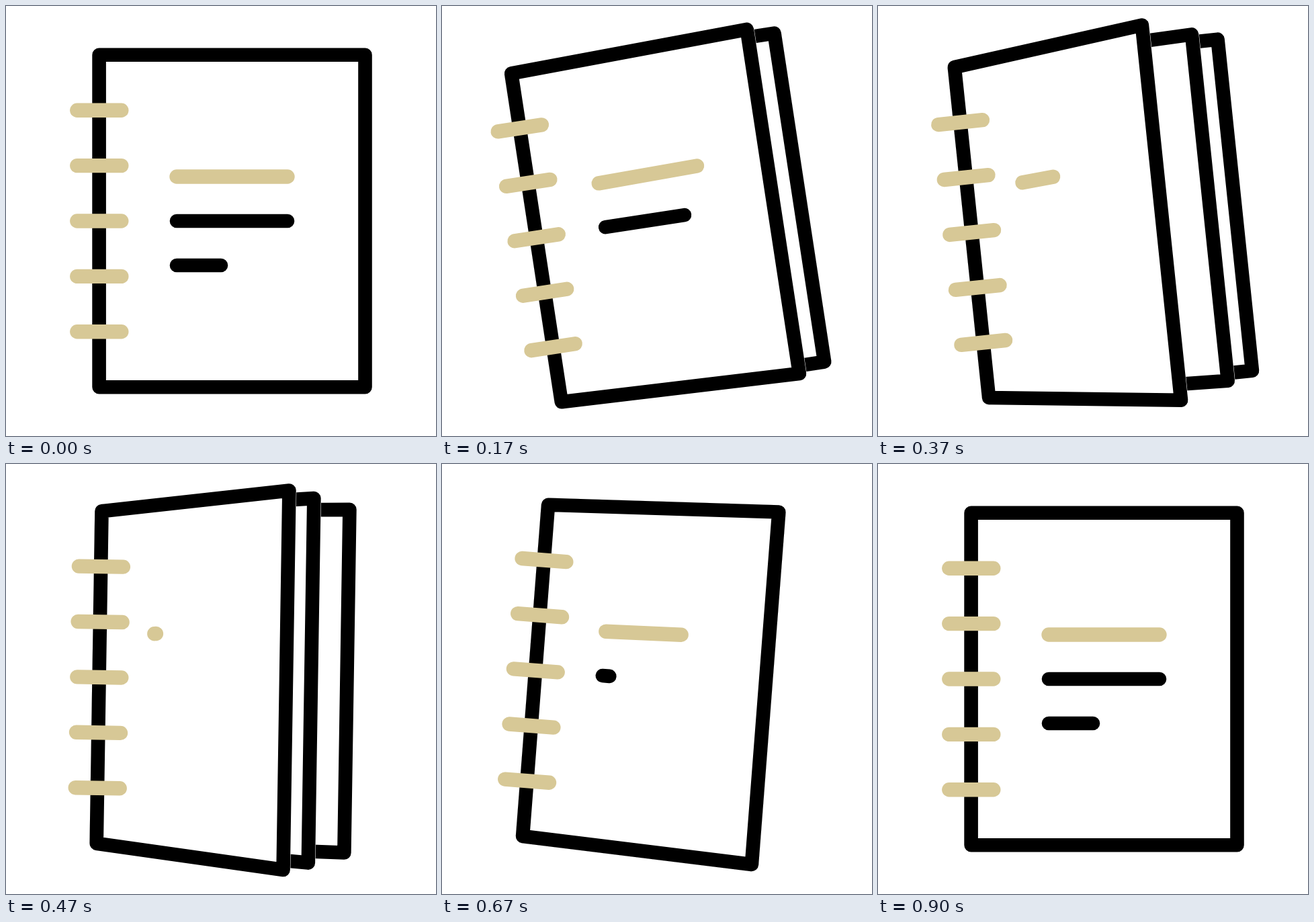
Write an HTML page with a canvas that moves like this. It is 640x640 px and loops after 1.67 s.

```html
<!DOCTYPE html>
<html lang="en">
<head>
<meta charset="utf-8">
<title>Notebook</title>
<style>
  html, body { margin: 0; width: 100%; height: 100%; overflow: hidden; background: #fff; }
  canvas { display: block; width: 100vw; height: 100vh; }
</style>
</head>
<body>
<canvas id="stage" width="640" height="640"></canvas>
<script>
const ctx = document.getElementById('stage').getContext('2d');
const LOOP = 1670, FPS = 30;
const GOLD = '#d7c896', BLACK = '#000', WHITE = '#fff';
const LEFT = 138.6, TOP = 72.7, BOTTOM = 567.3, WIDTH = 395.9;
const PIVOT = { x: 303, y: 320 };

// Smooth 0..1 ramp between two frames
function ramp(f, from, to) {
  const t = Math.min(1, Math.max(0, (f - from) / (to - from)));
  return t * t * (3 - 2 * t);
}

const tilt = f =>
  -10.5 * ramp(f, 0, 6.8) + 16.1 * ramp(f, 7.4, 17.67) - 5.6 * ramp(f, 17.67, 25.5);

// How far the free edge of a sheet has moved towards the spine
const coverFold = f => 119.5 * (ramp(f, 0, 13) - ramp(f, 13, 26));

// A sheet below never folds further than the cover
const sheetFold = (f, delay) => Math.min(coverFold(f), 120 * ramp(f, delay, delay + 13));

function sheet(fold) {
  const right = LEFT + WIDTH - fold, flare = fold * 0.298;
  ctx.beginPath();
  ctx.moveTo(LEFT, TOP);
  ctx.lineTo(right, TOP - flare);
  ctx.lineTo(right, BOTTOM + flare);
  ctx.lineTo(LEFT, BOTTOM);
  ctx.closePath();
  ctx.fillStyle = ctx.strokeStyle = WHITE;
  ctx.lineWidth = 21.6;
  ctx.stroke();
  ctx.fill();
  ctx.strokeStyle = BLACK;
  ctx.lineWidth = 20.6;
  ctx.stroke();
}

function bar(x1, y1, x2, y2, color) {
  ctx.strokeStyle = color;
  ctx.lineWidth = color === GOLD ? 21.4 : 20.6;
  ctx.beginPath();
  ctx.moveTo(x1, y1);
  ctx.lineTo(x2, y2);
  ctx.stroke();
}

// A line of writing on the cover, shown up to the given part of its length
function writing(y, length, part, fold, rise, color) {
  if (part <= 0) return;
  const s = 1 - fold / WIDTH, x = LEFT + 115.4 * s;
  bar(x, y, x + length * s * part, y - rise * part, color);
}

function draw(f) {
  const fold = coverFold(f);
  ctx.fillStyle = WHITE;
  ctx.fillRect(0, 0, 640, 640);
  ctx.save();
  ctx.translate(PIVOT.x, PIVOT.y);
  ctx.rotate(tilt(f) * Math.PI / 180);
  ctx.translate(-PIVOT.x, -PIVOT.y);
  ctx.lineCap = ctx.lineJoin = 'round';

  sheet(sheetFold(f, 10));
  sheet(sheetFold(f, 6));
  sheet(fold);

  writing(254, 165, 1 - ramp(f, 5.9, 14.8) + ramp(f, 15.3, 22), fold, fold * 0.089, GOLD);
  writing(320, 165, 1 - ramp(f, 3, 10) + ramp(f, 19, 25), fold, 0, BLACK);
  writing(386, 66, 1 - ramp(f, 0, 5) + ramp(f, 22.2, 27), fold, 0, BLACK);

  for (let i = 0; i < 5; i++) {
    const y = 155.2 + i * 82.4;
    bar(105.8, y, 171.8, y, GOLD);
  }
  ctx.restore();
}

const start = performance.now();
function tick() {
  const t = (performance.now() - start) % LOOP;
  draw(Math.floor((t + 3.4) * FPS / 1000));
  requestAnimationFrame(tick);
}
tick();
</script>
</body>
</html>
```
